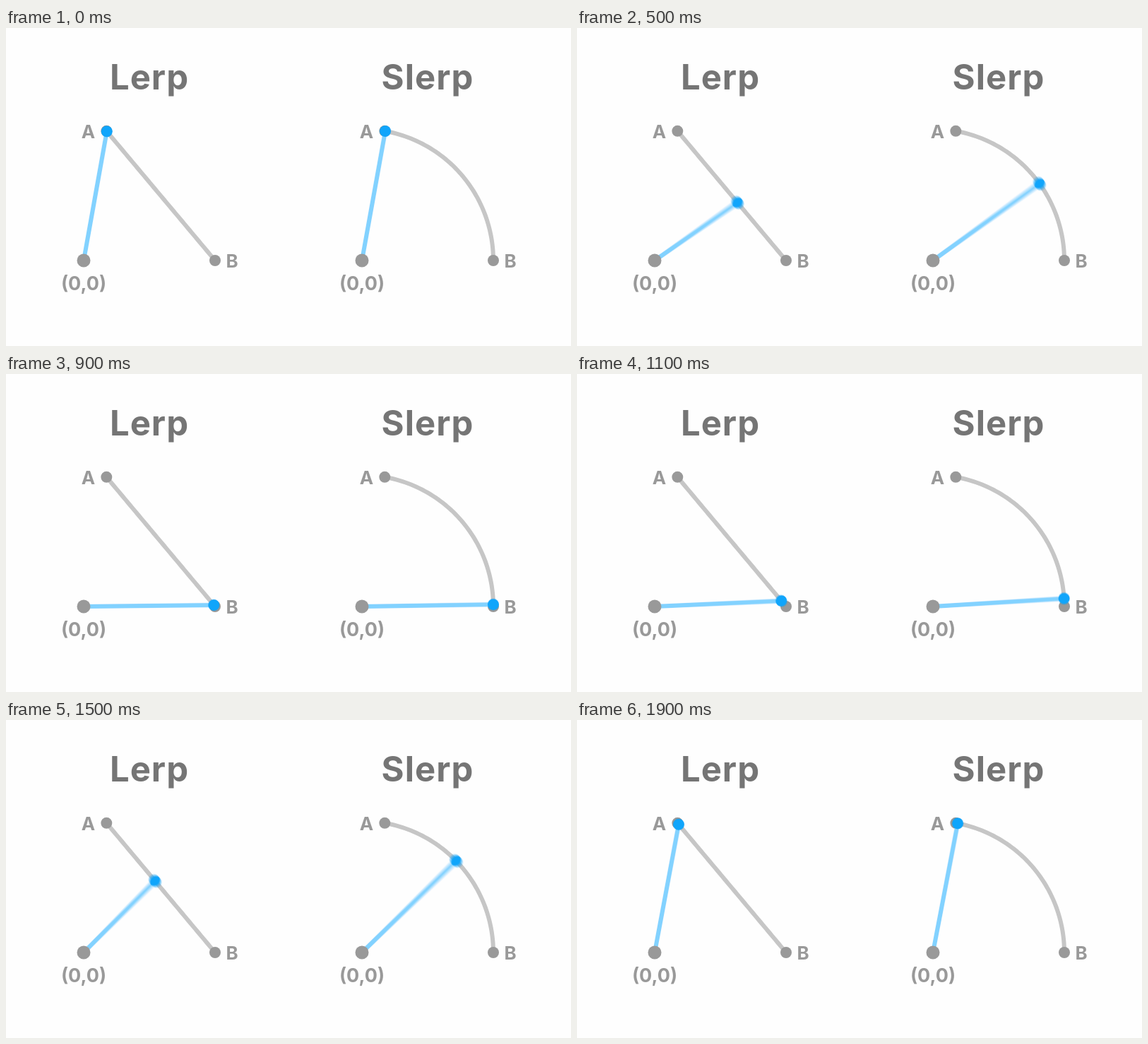
These frames come from a looping animation (800x450 px, 2000 ms). An HTML page with a canvas:

```html
<!DOCTYPE html>
<html lang="en">
<head>
<meta charset="utf-8">
<title>Lerp and Slerp</title>
<style>
  html, body { margin: 0; width: 100%; height: 100%; overflow: hidden; background: #fefefe; }
  canvas { display: block; }
</style>
</head>
<body>
<canvas id="stage" width="800" height="450"></canvas>
<script>
const LOOP = 2000, STEP = 100;          // ms
const LEAD = 33.5, SHUTTER = 17, SAMPLES = 12;
const RADIUS = 186, ANGLE = 80 * Math.PI / 180, FLOOR = 329;
const COLORS = {
  back: '#fefefe', title: '#757575', label: '#999999', point: '#999999',
  path: '#c6c6c6', arm: '#82d2ff', dot: '#10a5fb'
};

const stage = document.getElementById('stage').getContext('2d');
const layer = document.createElement('canvas');
layer.width = 800;
layer.height = 450;
const ctx = layer.getContext('2d');

const onArc = (x, angle) => [x + RADIUS * Math.cos(angle), FLOOR - RADIUS * Math.sin(angle)];
const mix = (a, b, t) => a + (b - a) * t;

const lerp = (x, t) => {
  const [a, b] = [onArc(x, ANGLE), onArc(x, 0)];
  return [mix(a[0], b[0], t), mix(a[1], b[1], t)];
};
const slerp = (x, t) => onArc(x, ANGLE * (1 - t));

function circle([x, y], radius, color) {
  ctx.fillStyle = color;
  ctx.beginPath();
  ctx.arc(x, y, radius, 0, 2 * Math.PI);
  ctx.fill();
}

function polyline(points, color) {
  ctx.strokeStyle = color;
  ctx.lineWidth = 6;
  ctx.beginPath();
  points.forEach(p => ctx.lineTo(...p));
  ctx.stroke();
}

function text(string, x, y, size, color, spacing = 0) {
  ctx.font = `700 ${size}px Inter, sans-serif`;
  ctx.letterSpacing = spacing + 'px';
  ctx.textAlign = 'center';
  ctx.fillStyle = color;
  ctx.fillText(string, x, y);
}

function diagram(title, x, position, t) {
  const origin = [x, FLOOR], tip = position(x, t);
  text(title, x + 93, 86.5, 49, COLORS.title, 1);
  text('A', x + 6.5, 155.5, 26, COLORS.label);
  text('B', x + 210, 338.5, 26, COLORS.label);
  text('(0,0)', x, 370.5, 27, COLORS.label);

  polyline(Array.from({ length: 61 }, (_, i) => position(x, i / 60)), COLORS.path);
  circle(position(x, 0), 8, COLORS.point);
  circle(position(x, 1), 8, COLORS.point);
  polyline([origin, tip], COLORS.arm);
  circle(origin, 9.5, COLORS.point);
  circle(tip, 8, COLORS.dot);
}

function drawScene(time) {
  const t = (1 - Math.cos(2 * Math.PI * time / LOOP)) / 2;
  ctx.fillStyle = COLORS.back;
  ctx.fillRect(0, 0, 800, 450);
  diagram('Lerp', 110, lerp, t);
  diagram('Slerp', 504, slerp, t);
}

// Motion blur: a running average of scenes across the shutter time.
function render(time) {
  for (let i = 0; i < SAMPLES; i++) {
    drawScene(time + LEAD + ((i + 0.5) / SAMPLES - 0.5) * SHUTTER);
    stage.globalAlpha = 1 / (i + 1);
    stage.drawImage(layer, 0, 0);
  }
}

const start = performance.now();
let shown = -1;

function frame() {
  const elapsed = performance.now() - start + 5;
  const step = Math.floor(elapsed % LOOP / STEP);
  if (step !== shown) render(step * STEP);
  shown = step;
  requestAnimationFrame(frame);
}
frame();
</script>
</body>
</html>
```
